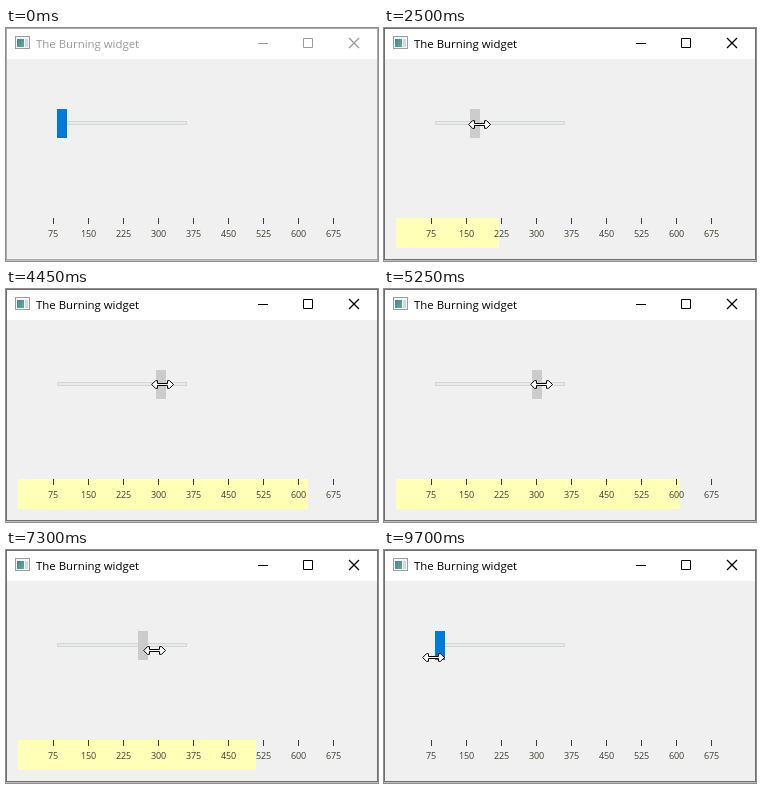
Animation of 372x233 px, one loop 9.9 s. Source, as an HTML page:

```html
<!DOCTYPE html>
<html lang="en">
<head>
<meta charset="utf-8">
<title>The Burning widget</title>
<style>
  html, body { margin: 0; width: 100%; height: 100%; overflow: hidden; background: #c0c0c0; }
  svg { display: block; width: 100vw; height: 100vh; }
  text { font-family: "Open Sans", "Noto Sans", sans-serif; }
  .crisp { shape-rendering: crispEdges; }
</style>
</head>
<body>
<svg viewBox="0 0 372 233">
  <defs>
    <linearGradient id="teal" x1="0" y1="0" x2="1" y2="1">
      <stop offset="0" stop-color="#4a7f9c"/>
      <stop offset="1" stop-color="#5fae96"/>
    </linearGradient>
  </defs>
  <rect width="372" height="232" fill="#f0f0f0"/>
  <rect width="372" height="31" fill="#fff"/>
  <rect id="frame" x=".5" y=".5" width="371" height="231" fill="none"/>

  <g class="crisp">
    <rect x="9.5" y="8.5" width="14" height="12" fill="#f4f6f6" stroke="#9a9fa3"/>
    <rect x="11" y="11" width="7" height="8" fill="url(#teal)"/>
    <rect x="19" y="11" width="3" height="8" fill="#d3dadb"/>
  </g>
  <text id="title" x="30" y="20" font-size="11.4">The Burning widget</text>
  <g id="buttons" fill="none" stroke-linejoin="round">
    <path d="M252 15.5h10M297.5 10.5h9v9h-9z"/>
    <path d="M343 10l10 10M353 10l-10 10" stroke-width="1.3"/>
  </g>

  <rect x="51.5" y="93.5" width="129" height="3" fill="#e7eaea" stroke="#d6d6d6"/>
  <rect id="handle" class="crisp" y="81" width="10" height="29"/>

  <g class="crisp">
    <rect id="safe" x="12" y="190" height="30" fill="#ffffb8"/>
    <rect id="over" x="336" y="190" height="30" fill="#ffafaf"/>
  </g>
  <g id="scale" fill="#3c3c32" font-size="9" letter-spacing="-.14"></g>

  <path id="cursor" fill="#fff" stroke="#000"
    d="M.7 4.5L4.5 .7H6.5V3.5H16.5V.7H18.5L22.5 4.5L18.5 8.3H16.5V5.5H6.5V8.3H4.5Z"/>
</svg>
<script>
const LOOP = 9900, STEP = 50;
const ACTIVE = 1150, RELEASE = 9700;
const MAX = 750, LIMIT = 700, WIDTH = 348;
const FULL = Math.floor(WIDTH / MAX * LIMIT);
const LEFT = 51, TRAVEL = 119, GRIP = 5;

// pointer turning points: time, position
const pathX = [
  [500, -24], [1000, 46], [1150, 46], [1350, 49], [1450, 49],
  [2450, 81], [2500, 84], [3500, 170], [4050, 170], [4800, 124],
  [5850, 175], [6150, 175], [6250, 161], [6300, 165], [7100, 95],
  [7300, 137], [7700, 179], [8100, 179], [9500, 38]
];
const pathY = [
  [500, 105], [1000, 94], [3500, 91], [6300, 91], [7300, 96], [8100, 94],
  [8450, 94], [9500, 103]
];

const $ = id => document.getElementById(id);
const clamp = (v, lo, hi) => Math.min(hi, Math.max(lo, v));
const set = (id, attrs) => {
  for (const name in attrs) $(id).setAttribute(name, attrs[name]);
};

let marks = "";
for (let i = 1; i < 10; i++) {
  const x = 12 + 35 * i, label = String(75 * i);
  marks += `<rect class="crisp" x="${x}" y="190" width="1" height="6"/>` +
    `<text x="${Math.ceil(x - 2.5 * label.length)}" y="209">${label}</text>`;
}
$("scale").innerHTML = marks;

function at(path, t) {
  const last = path[path.length - 1];
  const time = clamp(t, path[0][0], last[0]);
  const i = Math.max(1, path.findIndex(p => p[0] >= time));
  const [t0, v0] = path[i - 1], [t1, v1] = path[i];
  return Math.round(v0 + (v1 - v0) * (time - t0) / (t1 - t0));
}

function handleColor(t) {
  if (t < ACTIVE || t >= RELEASE) return "#007ad9";
  const u = Math.min(1, (t - ACTIVE + STEP) / 200);
  const mix = (a, b) => Math.round(a + (b - a) * u);
  return `rgb(${mix(0, 204)},${mix(122, 204)},${mix(217, 204)})`;
}

function draw(t) {
  const active = t >= ACTIVE;
  const ink = active ? "#000" : "#999";
  set("frame", { stroke: active ? "#707070" : "#aaa" });
  set("title", { fill: ink });
  set("buttons", { stroke: ink });

  const x = at(pathX, t), y = at(pathY, t);
  // the handle trails one step behind a pull to the right
  const grab = Math.min(x, at(pathX, t - STEP)) + GRIP;
  const pos = active ? clamp(grab - LEFT, 0, TRAVEL) : 0;
  const value = 1 + Math.round(pos / TRAVEL * (MAX - 1));
  set("handle", { x: LEFT + pos, fill: handleColor(t) });
  set("cursor", { transform: `translate(${x} ${y})` });

  const till = Math.floor(WIDTH / MAX * value);
  const bar = till ? Math.min(WIDTH, till + 1) : 0;
  const safe = value >= LIMIT ? FULL : bar;
  set("safe", { width: safe });
  set("over", { width: bar - safe });
}

function tick() {
  const t = performance.now() % LOOP;
  draw(Math.floor(t / STEP) * STEP);
  requestAnimationFrame(tick);
}
tick();
</script>
</body>
</html>
```
